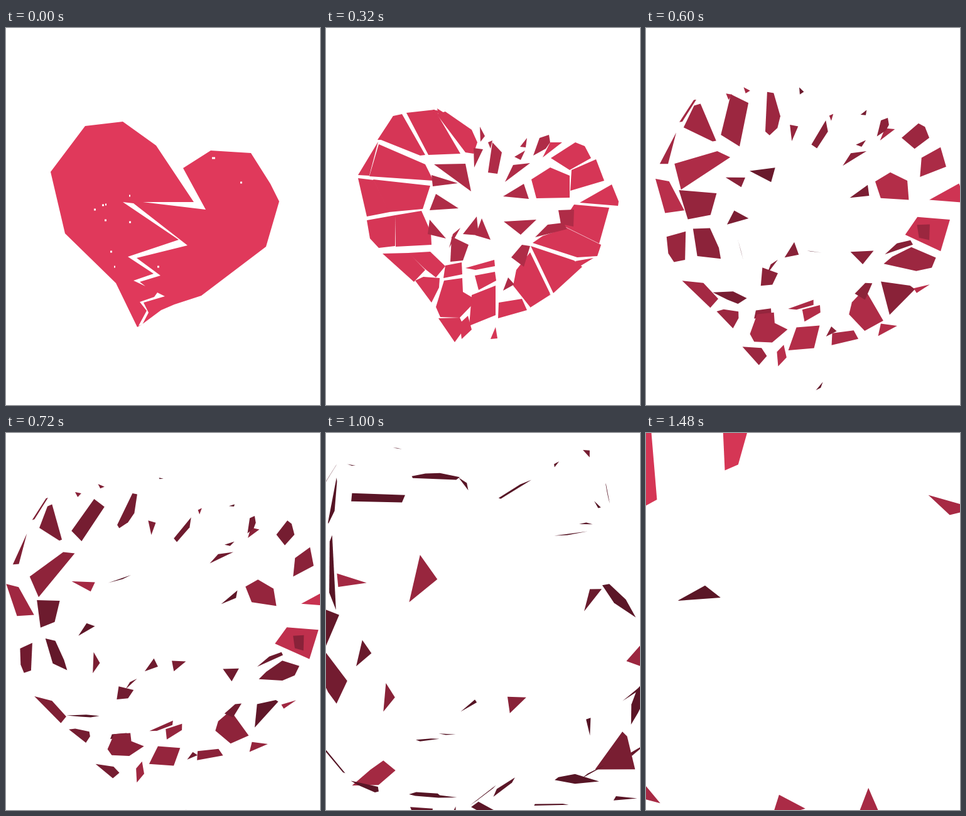
Animation, 500 px wide and 600 px high, one loop 1.52 s. Source, as an HTML page without scripts:

```html
<!DOCTYPE html>
<html lang="en">
<head>
<meta charset="utf-8">
<title>Shattering heart</title>
<style>
/* --k: travel, --w: tumble progress, --g: size, --f: fall */
@property --k { syntax: "<number>"; inherits: true; initial-value: 0 }
@property --w { syntax: "<number>"; inherits: true; initial-value: 0 }
@property --g { syntax: "<number>"; inherits: true; initial-value: 1 }
@property --f { syntax: "<number>"; inherits: true; initial-value: 0 }

html, body { margin: 0; height: 100%; overflow: hidden; background: #fff }
svg { display: block; width: 100vw; height: 100vh }
.heart, .core { fill: #e0395b }
.heart { animation: heart 1.52s step-end infinite }
.cracks { fill: #fff; animation: cracks 1.52s step-end infinite }
.specks { stroke: #fff; stroke-width: 3 }
.core { transform-origin: 254px 285px; animation: core 1.52s infinite }
.shards { --s: 0; --l: 1; animation: burst 1.52s infinite }
.inner { --l: .7 }

/* --x --y: drift, --r: tumble axis, --t: tumble, --s: spin, --l: light */
.shards polygon {
  --c: cos(var(--t) * var(--w) * 1deg);
  --b: var(--c) * var(--c) * var(--l);
  fill: rgb(calc(84 + 130 * var(--b)), calc(20 + 34 * var(--b)), calc(36 + 50 * var(--b)));
  transform-box: fill-box;
  transform-origin: center;
  transform:
    translate(calc(var(--x) * var(--k) * 1px), calc((var(--y) * var(--k) + var(--f)) * 1px))
    rotate(calc((var(--r) + var(--s) * var(--w)) * 1deg))
    scale(var(--g), calc(var(--g) * var(--c)))
    rotate(calc(var(--r) * -1deg));
}

@keyframes heart { 0% { opacity: 1 } 5.26%, 100% { opacity: 0 } }
@keyframes cracks { 0% { opacity: 1 } 13.15%, 100% { opacity: 0 } }
@keyframes core {
  0% { transform: scale(0); animation-timing-function: step-end }
  5.26% { transform: scale(1); animation-timing-function: steps(5) }
  18.41%, 100% { transform: scale(0) }
}
@keyframes burst {
  0% { opacity: 0; --k: -.23; --w: 0; --g: 1.15; --f: 0; animation-timing-function: step-end }
  5.26% { opacity: 1; --k: -.23; --w: 0; --g: 1.15; --f: 0; animation-timing-function: steps(6) }
  21.05% { opacity: 1; --k: 0; --w: 0; --g: 1; --f: 0; animation-timing-function: steps(4) }
  31.57% { opacity: 1; --k: .19; --w: .4; --g: .95; --f: 0; animation-timing-function: steps(6) }
  47.36% { opacity: 1; --k: .45; --w: 1; --g: .9; --f: 0; animation-timing-function: steps(7) }
  65.78% { opacity: 1; --k: 1; --w: 1.7; --g: 1.2; --f: 0; animation-timing-function: steps(4) }
  76.31% { opacity: 1; --k: 1.35; --w: 2.1; --g: 1.3; --f: 8; animation-timing-function: steps(8) }
  97.36%, 100% { opacity: 1; --k: 2.15; --w: 2.9; --g: 1.6; --f: 30 }
}
</style>
</head>
<body>
<svg viewBox="0 0 500 600">
  <path class="heart" d="M71 229 126 156 186 149 239 187 299 277 218 277 318 289 282 223 326 195 390 199 421 248 435 276 414 348 311 426 268 440 247 449 216 472 209 476 175 406 94 327Z"/>
  <polygon class="core" points="250,195 270,235 305,240 330,285 300,330 262,400 215,365 180,320 185,255 230,240"/>

  <g class="shards">
    <!-- left lobe -->
    <polygon points="82,178 107,140 112,140 88,178" style="--x:-95;--y:-85;--r:122;--t:55"/>
    <polygon points="85,177 107,140 121,137 158,202 150,203" style="--x:-110;--y:-60;--r:97;--t:56"/>
    <polygon points="128,135 173,130 214,200 163,202" style="--x:-88;--y:-63;--r:90;--t:60;--s:50"/>
    <polygon points="176,137 190,133 232,162 241,182 235,200 222,198" style="--x:-34;--y:-96;--r:95;--t:60;--s:45"/>
    <polygon points="170,130 181,132 174,143" style="--x:-134;--y:-85;--r:10;--t:50"/>
    <polygon points="177,128 188,135 180,141" style="--x:-68;--y:-110;--r:10;--t:55"/>
    <polygon points="51,234 83,181 69,235" style="--x:-100;--y:-51;--r:105;--t:55"/>
    <polygon points="69,236 84,185 158,217 171,243" style="--x:-112;--y:3;--r:-10;--t:48;--s:-50"/>
    <polygon points="51,239 76,242 101,293 65,300" style="--x:-118;--y:-4;--r:50;--t:40"/>
    <polygon points="75,241 166,251 154,288 100,293" style="--x:-122;--y:40;--r:100;--t:64"/>
    <polygon points="65,306 110,298 110,347 84,350 70,335" style="--x:-125;--y:76;--r:95;--t:62"/>
    <polygon points="110,298 152,291 167,325 168,345 111,348" style="--x:-132;--y:69;--r:65;--t:70"/>

    <!-- lower left and tip -->
    <polygon points="90,359 132,358 158,385 140,404" style="--x:-115;--y:135;--r:50;--t:55"/>
    <polygon points="131,358 166,356 190,379 175,397 157,383" style="--x:-85;--y:165;--r:-2;--t:83"/>
    <polygon points="142,402 155,396 181,398 180,413 168,437" style="--x:-95;--y:145;--r:20;--t:60"/>
    <polygon points="190,378 216,373 217,392 187,398" style="--x:-50;--y:215;--r:0;--t:65"/>
    <polygon points="188,402 217,398 218,420 240,433 213,461 182,460 175,444" style="--x:-38;--y:147;--r:5;--t:50"/>
    <polygon points="179,462 213,461 221,478 205,500" style="--x:-82;--y:130;--r:20;--t:60"/>
    <polygon points="213,470 226,458 232,480 216,495" style="--x:-20;--y:140;--r:100;--t:40"/>
    <polygon points="232,425 270,410 270,457 228,474" style="--x:8;--y:160;--r:0;--t:45;--s:20"/>
    <polygon points="262,495 270,476 273,494" style="--x:30;--y:262;--r:-40;--t:100"/>
    <polygon points="222,382 268,369 269,379 238,385" style="--x:4;--y:200;--r:-40;--t:50"/>
    <polygon points="237,394 269,388 271,402 243,417" style="--x:28;--y:162;--r:-40;--t:45"/>

    <!-- lower right -->
    <polygon points="275,437 312,431 320,449 274,462" style="--x:62;--y:145;--r:0;--t:50"/>
    <polygon points="330,420 358,424 325,445" style="--x:135;--y:150;--r:5;--t:45"/>
    <polygon points="298,410 303,385 325,357 357,423 325,444" style="--x:72;--y:150;--r:0;--t:48"/>
    <polygon points="326,347 395,370 408,380 362,422" style="--x:96;--y:130;--r:-50;--t:72"/>
    <polygon points="397,371 426,366 403,380" style="--x:85;--y:132;--r:-45;--t:40"/>
    <polygon points="329,342 345,331 383,318 438,345 432,363 400,365" style="--x:115;--y:85;--r:-55;--t:60"/>

    <!-- right lobe -->
    <polygon points="395,281 451,286 435,343 374,313" style="--x:112;--y:50;--r:0;--t:25"/>
    <polygon points="404,278 455,249 466,276 465,283" style="--x:140;--y:-10;--r:0;--t:20"/>
    <polygon points="391,226 430,209 443,243 389,259" style="--x:130;--y:-65;--r:100;--t:50"/>
    <polygon points="327,241 357,222 388,235 388,270 335,271" style="--x:105;--y:14;--r:50;--t:45"/>
    <polygon points="358,207 397,182 412,188 422,207 388,226" style="--x:122;--y:-100;--r:90;--t:60"/>
    <polygon points="357,182 376,182 345,206" style="--x:75;--y:-75;--r:50;--t:50"/>

    <!-- core pieces, darker -->
    <g class="inner">
      <polygon points="330,203 340,175 355,170 357,182 350,192" style="--x:105;--y:-90;--r:80;--t:54"/>
      <polygon points="309,189 320,175 318,190" style="--x:100;--y:-150;--r:5;--t:75"/>
      <polygon points="245,157 253,172 246,181" style="--x:-4;--y:-215;--r:0;--t:85"/>
      <polygon points="258,182 265,179 262,192" style="--x:104;--y:-135;--r:-30;--t:40"/>
      <polygon points="258,230 265,182 280,198 273,232" style="--x:32;--y:-118;--r:90;--t:58;--s:35"/>
      <polygon points="235,191 250,193 236,222" style="--x:-18;--y:-122;--r:40;--t:46"/>
      <polygon points="172,217 222,216 231,260" style="--x:-60;--y:-6;--r:-33;--t:88;--s:13"/>
      <polygon points="168,234 210,247 170,252" style="--x:-148;--y:-9;--r:100;--t:200"/>
      <polygon points="165,290 175,264 211,287" style="--x:-125;--y:68;--r:-50;--t:70"/>
      <polygon points="165,305 191,335 162,328" style="--x:-82;--y:100;--r:75;--t:130"/>
      <polygon points="200,332 227,345 218,370 198,372" style="--x:-50;--y:136;--r:-5;--t:55"/>
      <polygon points="196,350 202,328 214,318" style="--x:-12;--y:145;--r:-8;--t:58"/>
      <polygon points="218,328 240,300 243,330" style="--x:-2;--y:120;--r:-5;--t:58;--s:-20"/>
      <polygon points="238,330 248,303 262,337" style="--x:50;--y:112;--r:8;--t:130"/>
      <polygon points="283,308 335,305 310,329" style="--x:110;--y:150;--r:85;--t:57"/>
      <polygon points="282,268 315,248 323,272" style="--x:122;--y:3;--r:-45;--t:70"/>
      <polygon points="285,245 298,218 325,215" style="--x:85;--y:-70;--r:-10;--t:56"/>
      <polygon points="300,205 317,195 310,210" style="--x:105;--y:-58;--r:-5;--t:60"/>
      <polygon points="325,347 312,345 295,365 315,380" style="--x:112;--y:178;--r:-30;--t:55"/>
      <polygon points="333,333 353,313 378,310 384,320" style="--x:140;--y:85;--r:-35;--t:60"/>
      <polygon points="370,290 395,289 394,316 374,312" style="--x:185;--y:70;--r:90;--t:40"/>
      <polygon points="290,397 300,408 282,418" style="--x:14;--y:235;--r:-15;--t:55"/>
    </g>
  </g>

  <g class="cracks">
    <path d="M186 277 203 279 289 346 208 366 246 394 213 404 222 411 203 402 235 391 194 364 275 337Z"/>
    <path d="M241 421 253 427 219 437 227 453 217 472 211 474 224 450 213 436 236 428Z"/>
    <path class="specks" d="M140 289h3M153 282h3M158 281h2M157 306h3M196 267h2M196 309h3M166 356h3M172 380h2M241 380h3M373 246h3M328 207h5"/>
  </g>
</svg>
</body>
</html>
```
